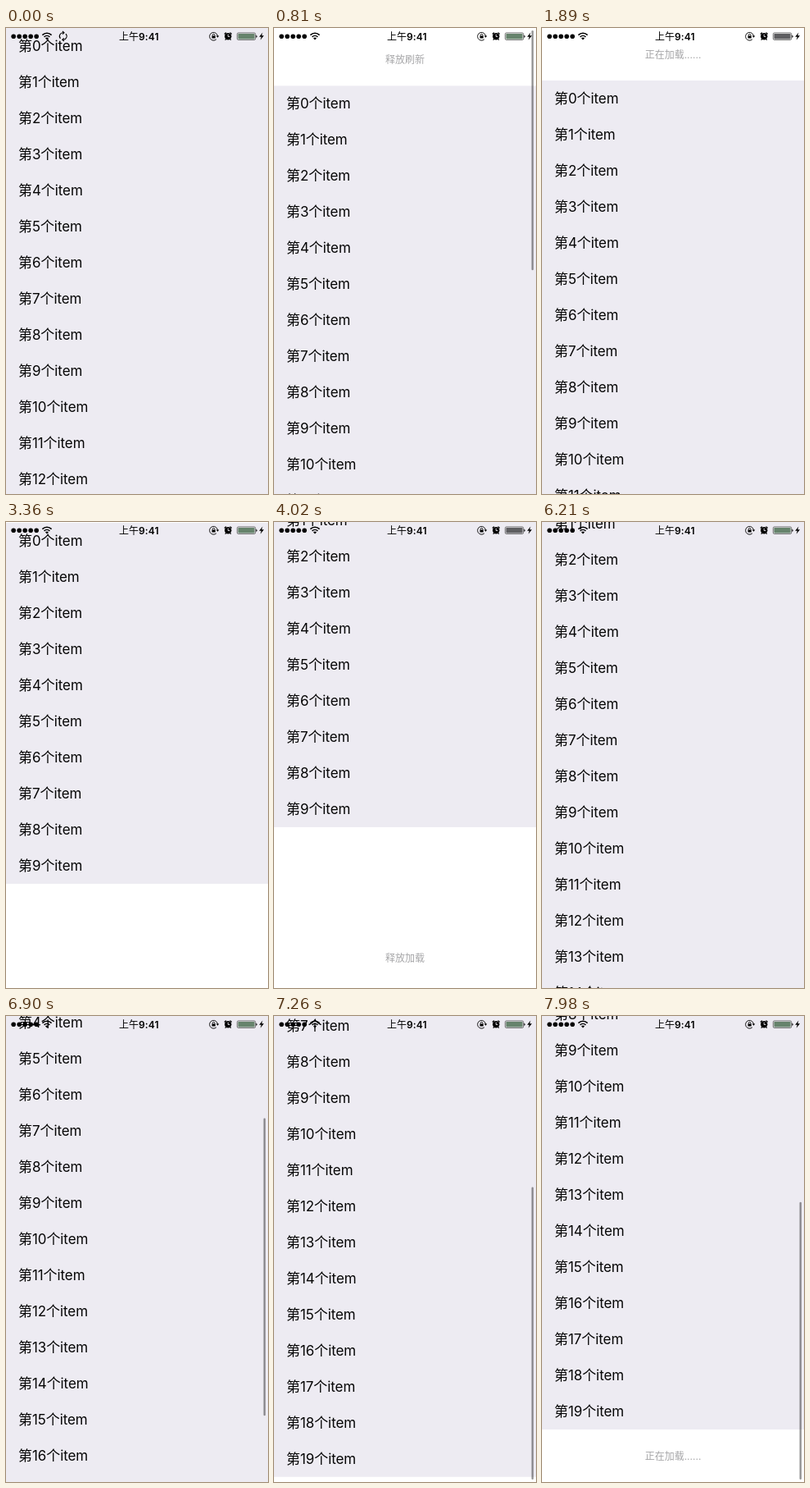
An HTML page that plays this animation: 320 by 568 pixels, repeating every 8000 ms.

```html
<!DOCTYPE html>
<html lang="zh">
<head>
<meta charset="utf-8">
<title>List refresh</title>
<style>
html, body { margin: 0; width: 100%; height: 100%; overflow: hidden; background: #fff; }
svg { display: block; width: 320px; height: 568px; }
text { font-family: Inter, "Noto Sans CJK SC", "Noto Sans CJK", sans-serif; }
.row { font-size: 17px; letter-spacing: -.08px; fill: #050505; }
.hint { font-size: 12px; fill: #a6a6a8; text-anchor: middle; }
.clock { font-size: 12px; font-weight: 500; letter-spacing: .1px; text-anchor: middle; }
.digits { font-weight: 600; }
.line { fill: none; stroke: #000; }
</style>
</head>
<body>
<svg viewBox="0 0 320 568">
  <rect width="320" height="568" fill="#fff"/>
  <g id="list">
    <rect id="back" width="320" fill="#edebf2"/>
    <g id="rows"></g>
    <text id="head" class="hint" x="160" y="-27.5"></text>
    <text id="foot" class="hint" x="160"></text>
  </g>
  <rect id="bar" x="314.5" width="2.5" rx="1.25" fill="#000"/>
  <g id="status">
    <g id="dots"></g>
    <g class="line" stroke-width="1.6">
      <path d="M44.4 8.6a8 8 0 0 1 11.2 0"/>
      <path d="M46.6 10.9a4.9 4.9 0 0 1 6.8 0"/>
    </g>
    <path d="M50 14.6l-2-2.1a2.9 2.9 0 0 1 4 0z"/>
    <g id="sync" class="line" stroke-width="1.1">
      <path d="M66.5 12.8a4.2 4.2 0 0 1 3.8-7"/>
      <path d="M73 7.2a4.2 4.2 0 0 1-3.8 7"/>
      <path d="M69 4l2 1.8-2 1.7M70.8 12.5l-2 1.7 2 1.8"/>
    </g>
    <text class="clock" x="162.3" y="14.6">上午<tspan class="digits">9:41</tspan></text>
    <path class="line" stroke-width=".9" d="M256.9 13.8a4.9 4.9 0 1 1 1.5-3.6"/>
    <path d="M256.7 9.4h3.6l-1.8 2.3zM251.5 9.5h4.2v3.1h-4.2z"/>
    <path class="line" stroke-width=".9" d="M252.3 9.6v-.9a1.3 1.3 0 0 1 2.6 0v.9"/>
    <circle cx="271.2" cy="10.2" r="4.2"/>
    <path class="line" stroke-width="1.3" stroke-linecap="round" d="M267.2 7.1l1.3-1.2M275.2 7.1l-1.3-1.2M268.6 13.6l-.5.6M273.8 13.6l.5.6"/>
    <path fill="none" stroke="#f2f0f6" stroke-width=".9" d="M271.2 7.6v2.9h2.1"/>
    <rect x="282.3" y="5.9" width="22.4" height="8.6" rx="1.6" fill="none" stroke="#555" stroke-width=".8"/>
    <rect id="charge" x="283.4" y="7" width="20.2" height="6.4" rx=".6"/>
    <path d="M305.4 8.5a1.8 1.8 0 0 1 0 3.4z"/>
    <path d="M313.4 5.4l-4.2 5.4h2.6l-1.2 4 4.4-5.6h-2.7z"/>
  </g>
</svg>
<script>
const LOOP = 8000, ROW = 44, VIEW = 568, HINT = 64;
const RELOAD = 2970, APPEND = 6060;
const $ = id => document.getElementById(id);
const set = (el, attrs) => { for (const k in attrs) el.setAttribute(k, attrs[k]); };
const add = (parent, tag, attrs) => {
  const el = document.createElementNS('http://www.w3.org/2000/svg', tag);
  set(el, attrs);
  return parent.appendChild(el);
};
const clamp = v => Math.max(0, Math.min(1, v));

const rows = [];
for (let i = 0; i < 20; i++) {
  const row = add($('rows'), 'text', { class: 'row', x: 15, y: i * ROW + 28 });
  row.textContent = `第${i}个item`;
  rows.push(row);
}
for (let i = 0; i < 5; i++) add($('dots'), 'circle', { cx: 9.2 + i * 7, cy: 10.2, r: 2.8 });

// [time, top edge of the list]
const keys = [
  [0, 0], [60, 0], [500, 42], [960, 78], [1120, 80], [1500, 64],
  [2940, 64], [3180, 26], [3360, 1], [3400, 0], [3440, 0],
  [3750, -48], [4020, -68], [4080, -69], [4380, -69], [4560, -64],
  [6540, -64], [6900, -190], [7260, -318], [7500, -362], [7710, -381],
  [7920, -381], [7980, -376], [LOOP, -376]
];
const slope = i => (keys[i + 1][1] - keys[i][1]) / (keys[i + 1][0] - keys[i][0]);
const tangent = i => {
  if (i === 0 || i === keys.length - 1) return 0;
  const a = slope(i - 1), b = slope(i);
  return a * b > 0 ? 2 * a * b / (a + b) : 0;
};

// Monotone cubic through the keys
function topAt(t) {
  let i = 0;
  while (i < keys.length - 2 && t >= keys[i + 1][0]) i++;
  const [t0, a] = keys[i], [t1, b] = keys[i + 1];
  const d = t1 - t0, u = (t - t0) / d, v = 1 - u;
  return a * (1 + 2 * u) * v * v + b * u * u * (3 - 2 * u)
    + d * u * v * (tangent(i) * v - tangent(i + 1) * u);
}

const hint = (busy, armed, pull, release) => busy ? '正在加载......' : armed ? release : pull;

function drawBar(t, scroll, height) {
  const inset = t >= 7950 ? HINT : 0;
  const total = height + inset, max = total - VIEW, track = VIEW - 6;
  const full = track * VIEW / total;
  const over = Math.max(0, scroll - max, -scroll);
  const size = full - over;
  const y = 3 + clamp(scroll / max) * (track - size);
  const alpha = t < 3000
    ? clamp((t - 60) / 100) * clamp((1500 - t) / 200)
    : clamp((t - 6540) / 100);
  set($('bar'), { y, height: size, opacity: alpha * .4 });
}

function draw(t) {
  const top = topAt(t), scroll = -top;
  const count = t >= RELOAD && t < APPEND ? 10 : 20;
  const height = count * ROW;
  const over = scroll - Math.max(0, height - VIEW);

  set($('list'), { transform: `translate(0 ${top.toFixed(2)})` });
  set($('back'), { height });
  rows.forEach((row, i) => set(row, { display: i < count ? 'inline' : 'none' }));

  $('head').textContent = hint(t >= 1130 && t < RELOAD, t < 1130 && top >= HINT, '下拉刷新', '释放刷新');
  $('foot').textContent = hint(t >= 4400 && t < APPEND || t >= 7940, over > HINT, '上拉加载', '释放加载');
  set($('foot'), { y: Math.max(height, VIEW) + 36.5 });

  drawBar(t, scroll, height);
  set($('sync'), { display: t < 500 ? 'inline' : 'none' });
  const grey = t >= 870 && t < RELOAD || t >= 3780 && t < APPEND;
  set($('charge'), { fill: grey ? '#5e5e61' : '#66836c' });
}

const start = performance.now();
function tick() {
  draw((performance.now() - start) % LOOP);
  requestAnimationFrame(tick);
}
tick();
</script>
</body>
</html>
```
